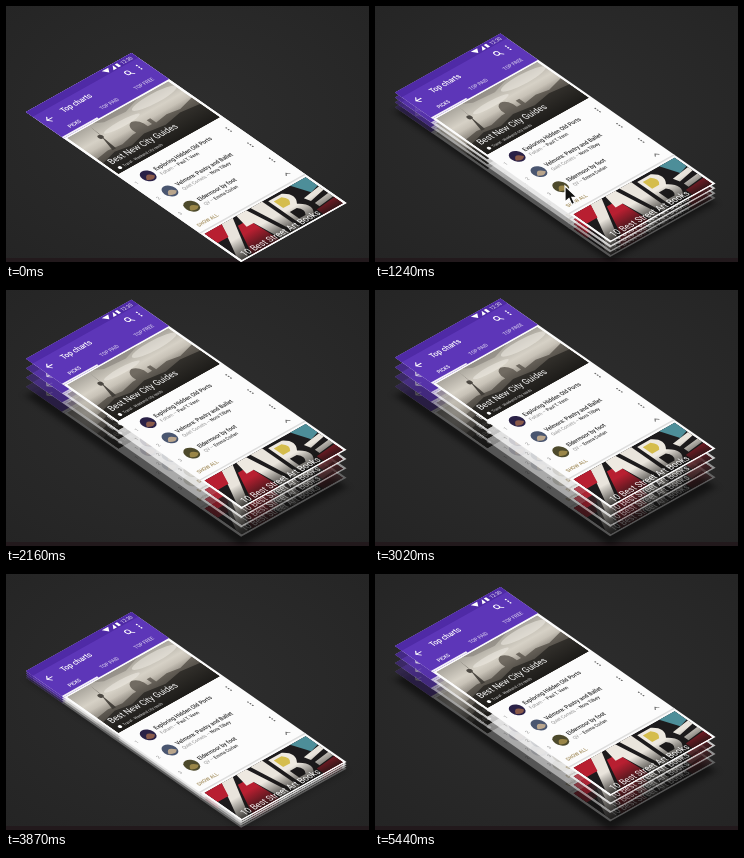
Write an HTML page that moves like this. It is 363 by 256 pixels and loops after 7150 ms.

```html
<!DOCTYPE html>
<html lang="en">
<head>
<meta charset="utf-8">
<title>Layered phone screen</title>
<style>
  html, body { margin: 0; width: 100%; height: 100%; overflow: hidden; background: #2a2a2a; }
  svg { display: block; width: 100%; height: 100%; }
  text { font-family: Roboto, Arial, sans-serif; }
</style>
</head>
<body>
<svg viewBox="0 0 363 256">
  <defs>
    <radialGradient id="floor" cx=".5" cy=".45" r=".75">
      <stop offset="0" stop-color="#2e2e2e"/><stop offset="1" stop-color="#242424"/>
    </radialGradient>
    <linearGradient id="sky" x1="0" y1="0" x2="0" y2="1">
      <stop offset="0" stop-color="#aaa69d"/><stop offset=".3" stop-color="#d6d1c6"/>
      <stop offset=".65" stop-color="#aaa398"/><stop offset="1" stop-color="#5e5952"/>
    </linearGradient>
    <linearGradient id="scrim" x1="0" y1="0" x2="0" y2="1">
      <stop offset="0" stop-color="#151412" stop-opacity="0"/>
      <stop offset="1" stop-color="#151412" stop-opacity=".8"/>
    </linearGradient>
    <filter id="soft" x="-20%" y="-20%" width="140%" height="140%"><feGaussianBlur stdDeviation="9"/></filter>
    <clipPath id="heroClip"><path d="M7 116H353V270H7z"/></clipPath>
    <clipPath id="artClip"><path d="M7 526H353V638H7z"/></clipPath>

    <g id="screen">
      <path fill="#fcfcfc" d="M0 0H360V642H0z"/>
      <path fill="#5d36b8" d="M0 0H360V112H0z"/>
      <path fill="#4f2aa6" d="M0 0H360V20H0z"/>
      <path fill="#f4f1fa" d="M0 107H120V112H0z"/>
      <g fill="#fff">
        <path d="M254 4H276L265 17zM291 17V4L279 17zM297 5H305V17H297z"/>
        <text x="313" y="16" font-size="14">12:30</text>
        <text x="70" y="52" font-size="21" font-weight="500">Top charts</text>
        <g font-size="14" font-weight="500" text-anchor="middle">
          <text x="60" y="97">PICKS</text>
          <text x="180" y="96" opacity=".7">TOP PAID</text>
          <text x="300" y="94" opacity=".7">TOP FREE</text>
        </g>
        <circle cx="336" cy="37" r="2.4"/><circle cx="336" cy="44" r="2.4"/><circle cx="336" cy="51" r="2.4"/>
      </g>
      <g fill="none" stroke="#fff" stroke-width="2.8">
        <circle cx="299" cy="42" r="6.5"/><path d="M304 47L311 54M35 48H18M26 39L17 48L26 57"/>
      </g>

      <g clip-path="url(#heroClip)">
        <path fill="url(#sky)" d="M7 116H353V270H7z"/>
        <g fill="#efece4" opacity=".55">
          <ellipse cx="280" cy="138" rx="75" ry="14"/><ellipse cx="150" cy="155" rx="60" ry="9"/>
        </g>
        <path fill="#85807a" opacity=".6" d="M95 116H250L190 132L120 128z"/>
        <path fill="#716b62" d="M7 206L50 200L95 205L140 196L152 196V184Q156 166 172 164Q188 166 192 184V196H206V180H218V198L260 192L300 198L353 186V270H7z"/>
        <path fill="#3b3833" d="M7 224L60 212L110 220L165 208L230 216L290 206L353 212V270H7z"/>
        <path fill="#4c4842" d="M82 117L72 206H60L79 150z"/>
        <circle cx="74" cy="158" r="7" fill="#4c4842"/>
        <path fill="url(#scrim)" d="M7 180H353V270H7z"/>
      </g>
      <text x="20" y="239" font-size="24" fill="#fff">Best New City Guides</text>
      <g fill="#fff">
        <circle cx="27" cy="257" r="5"/>
        <text x="38" y="261" font-size="11" opacity=".85">Travel · Weekend city reads</text>
      </g>

      <g id="rows"></g>
      <text x="16" y="503" font-size="14" font-weight="500" fill="#a08a58">SHOW ALL</text>
      <path d="M319 498L326 491L333 498" fill="none" stroke="#666" stroke-width="2.4"/>
      <path fill="#dedede" d="M0 517H360V521H0z"/>

      <g clip-path="url(#artClip)">
        <path fill="#1d1b1d" d="M7 526H353V638H7z"/>
        <path fill="#e9e4dc" d="M66 526H104L30 638H7V622z"/>
        <path fill="#b81f31" d="M7 526H66L44 566H7zM92 552H128L134 638H42z"/>
        <path fill="#eee9e1" d="M116 526H150L172 638H140L130 566H106z"/>
        <path fill="#e9e4dc" d="M164 526H204V638H184z"/>
        <path fill="#eee9e1" d="M216 534H262Q292 552 264 578Q300 600 264 628H216z"/>
        <path fill="#d5bd4d" d="M226 542H252Q268 556 250 570H226z"/>
        <path fill="#1d1b1d" d="M228 588H252Q266 602 250 616H228z"/>
        <path fill="#4d8e99" d="M300 526H353V562L322 570z"/>
        <path fill="#e9e4dc" d="M292 574L353 566V580L298 590zM300 600L353 594V608L300 614z"/>
        <path fill="#b81f31" d="M286 618L353 612V638H286z"/>
        <path fill="url(#scrim)" d="M7 580H353V638H7z"/>
      </g>
      <text x="22" y="634" font-size="24" fill="#fff">10 Best Street Art Books</text>
    </g>
  </defs>

  <path fill="url(#floor)" d="M0 0H363V256H0z"/>
  <path fill="#22191c" d="M0 252H363V256H0z"/>
  <g id="shade"><path d="M0 0H360V642H0z" filter="url(#soft)"/></g>
  <g id="stack"></g>
  <path id="cursor" d="M0 0V16L4 12.5L6.8 18.5L9.6 17.2L6.9 11.4H12z" fill="#111" stroke="#fff" stroke-width="1.2"/>
</svg>
<script>
const LOOP = 7150;
const SVG = 'http://www.w3.org/2000/svg';
const byId = id => document.getElementById(id);
const place = y => `matrix(.293 -.164 .335 .2336 20 ${y})`;
const easeOut = p => 1 - (1 - p) ** 1.7;
const smooth = p => p * p * (3 - 2 * p);
const clamp = v => Math.min(1, Math.max(0, v));

const books = [
  ['Exploring Hidden Old Ports', 'Foltam', 'Paul T. Venn', '#2a2147', '#8a5a4a'],
  ['Velmora: Pastry and Ballet', 'Quiet Comets', 'Nora Tilbey', '#4a5670', '#b9a58c'],
  ['Eldermoor by foot', 'QV', 'Emma Corlan', '#4d4a2c', '#9a8648']
];
byId('rows').innerHTML = books.map(([title, press, author, dark, light], i) => {
  const y = 314 + i * 65;
  const dots = [-7, 0, 7].map(d => `<circle cx="336" cy="${y - 3 + d}" r="2.2" fill="#666"/>`).join('');
  return `<text x="13" y="${y + 6}" font-size="13" fill="#888">${i + 1}</text>
    <circle cx="58" cy="${y}" r="19" fill="${dark}"/>
    <path d="M44 ${y + 8}Q58 ${y - 14} 72 ${y + 8}Q58 ${y + 20} 44 ${y + 8}" fill="${light}"/>
    <text x="87" y="${y - 1}" font-size="16" font-weight="500" fill="#2b2b2b">${title}</text>
    <text x="87" y="${y + 17}" font-size="13" fill="#8a8a8a">${press} — <tspan fill="#333" font-weight="500">${author}</tspan></text>${dots}`;
}).join('');

// Bottom layer first
const layers = [.28, .5, .75, 1].map((opacity, i) => {
  const use = document.createElementNS(SVG, 'use');
  use.setAttribute('href', '#screen');
  use.setAttribute('opacity', opacity);
  byId('stack').append(use);
  return { use, part: (i + 1) / 4 };
});

// Lift of the top layer: start, end, steps, from, to, easing
const runs = [
  [690, 2480, 24, 0, 39, easeOut],
  [3020, 3870, 12, 39, 9, smooth],
  [4180, 5440, 17, 9, 34, easeOut]
];

function liftAt(t) {
  let lift = 0;
  for (const [start, end, steps, from, to, ease] of runs) {
    if (t < start) break;
    const gap = (end - start) / (steps - 1);
    const step = Math.min(steps, Math.floor((t - start) / gap + .2) + 1);
    lift = from + (to - from) * ease(step / steps);
  }
  return lift;
}

function moveCursor(t) {
  const snap = Math.floor(t / 77.5) * 77.5;
  const enter = 1 - easeOut(clamp((snap - 1000) / 230));
  const leave = smooth(clamp((snap - 1470) / 600));
  const x = 190 + 22 * enter + 180 * leave;
  const y = 180 + 78 * enter - 30 * leave;
  byId('cursor').setAttribute('transform', `translate(${x} ${y})`);
  byId('cursor').style.display = t >= 1000 && t < 2160 ? '' : 'none';
}

function draw(t) {
  const lift = liftAt(t);
  for (const { use, part } of layers) use.setAttribute('transform', place(106 - lift * part));
  byId('shade').setAttribute('transform', place(106));
  byId('shade').setAttribute('opacity', .5 * clamp(lift / 20));
  moveCursor(t);
}

const begin = performance.now();
function tick() {
  draw((performance.now() - begin) % LOOP);
  requestAnimationFrame(tick);
}
tick();
</script>
</body>
</html>
```
